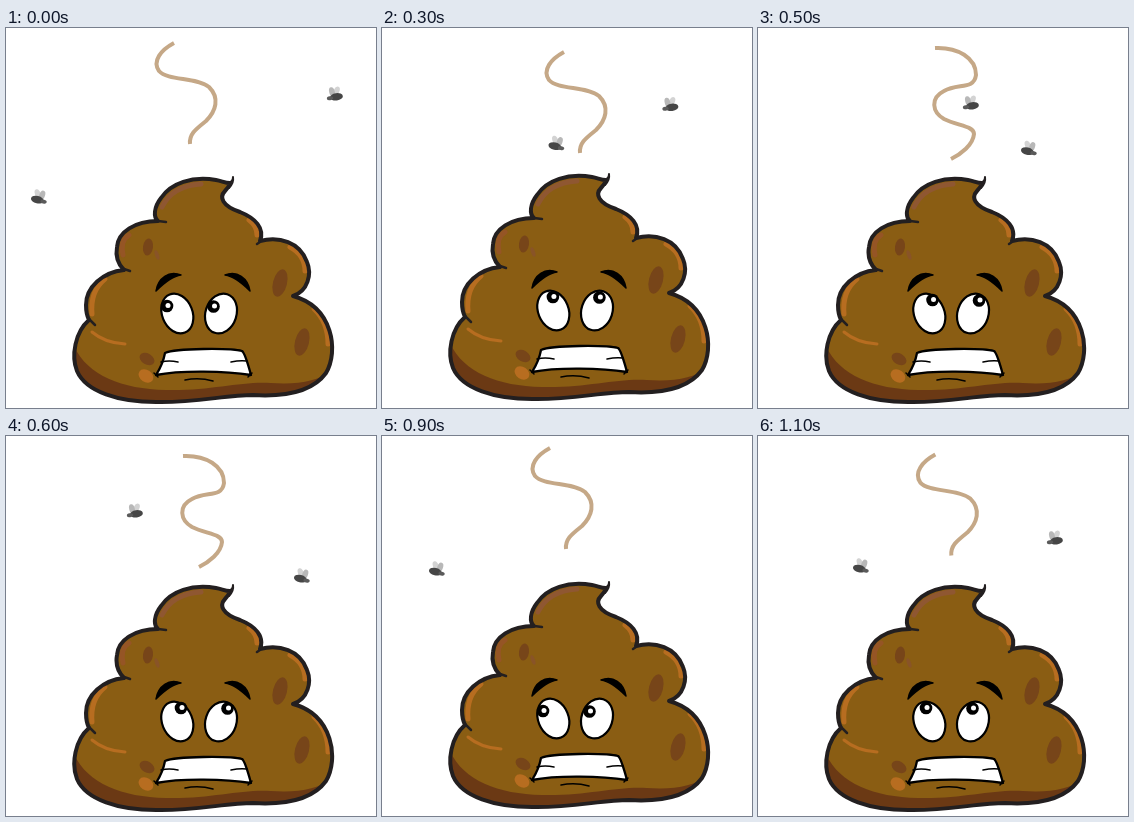
These frames come from a looping animation (370x380 px, 1200 ms). An HTML page:

```html
<!DOCTYPE html>
<html lang="en">
<head>
<meta charset="utf-8">
<title>Worried heap</title>
<style>
  html, body { margin: 0; width: 100%; height: 100%; overflow: hidden; background: #fff; }
  svg { display: block; width: 370px; height: 380px; }
  .line { fill: none; stroke-linecap: round; stroke-linejoin: round; }
</style>
</head>
<body>
<svg viewBox="0 0 370 380">
  <defs>
    <path id="shape" d="M224 155 C219 155 216 153 210 152 C186 148 165 155 155 170 C148 179 147 189 152 193
      C129 193 112 204 111 219 C109 230 113 237 118 242 C97 244 80 259 80 277 C80 283 81 288 83 292
      C69 304 65 328 71 343 C80 364 113 374 150 374 C188 375 220 367 247 367 C280 369 307 363 320 345
      C333 323 327 279 287 268 C302 263 306 246 301 234 C294 214 273 208 254 213
      C259 200 249 190 234 184 C216 178 213 169 219 163 Q223 159 224 155 Z"/>
    <clipPath id="inside"><use href="#shape"/></clipPath>
    <g id="fly">
      <ellipse cx="-1.5" cy="-3" rx="2.8" ry="4.8" fill="#d3d3d3" transform="rotate(-25 -1.5 -3)"/>
      <ellipse cx="3" cy="-2" rx="2.8" ry="4.8" fill="#b8b8b8" transform="rotate(15 3 -2)"/>
      <ellipse cx="-1" cy="3" rx="6.5" ry="3.7" fill="#464646" transform="rotate(8)"/>
      <ellipse cx="5.5" cy="3.5" rx="3.2" ry="2" fill="#5a5a5a" transform="rotate(8)"/>
    </g>
    <g id="pupil">
      <circle r="6.3"/>
      <circle cx="1" cy="-.5" r="2.5" fill="#fff"/>
    </g>
  </defs>

  <g id="scene">
    <path id="steam" class="line" stroke="#c5a887" stroke-width="4" style="stroke-linecap:butt"/>

    <g clip-path="url(#inside)">
      <use href="#shape" fill="#6b3914"/>
      <path fill="#8a5d13" d="M60 140 H340 V325 C325 352 300 357 265 355 C235 353 205 363 160 362 C115 361 80 347 67 316 Z"/>
    </g>
    <g class="line" stroke="#b76d20" stroke-width="5">
      <path stroke="#8f5731" d="M156 179 Q166 158 195 156"/>
      <path stroke="#955525" d="M117 227 Q114 212 123 207"/>
      <path d="M86 286 Q84 263 99 251"/>
      <path d="M86 304 Q99 315 119 316" stroke-width="3"/>
      <path d="M243 192 Q251 198 251 207"/>
      <path d="M284 219 Q299 227 299 243"/>
      <path d="M308 281 Q322 294 322 316"/>
    </g>
    <g fill="#774519">
      <ellipse cx="142" cy="219" rx="5" ry="8.5" transform="rotate(8 142 219)"/>
      <ellipse cx="274" cy="255" rx="7" ry="14" transform="rotate(14 274 255)"/>
      <ellipse cx="296" cy="314" rx="7" ry="14" transform="rotate(14 296 314)"/>
      <ellipse cx="141" cy="331" rx="8" ry="5.5" transform="rotate(30 141 331)"/>
      <ellipse cx="151" cy="227" rx="2" ry="5" fill="#895427" transform="rotate(-20 151 227)"/>
      <ellipse cx="140" cy="348" rx="8" ry="6" fill="#b76d20" transform="rotate(35 140 348)"/>
    </g>
    <use href="#shape" class="line" stroke="#231f20" stroke-width="4"/>
    <path class="line" stroke="#231f20" stroke-width="2.5"
      d="M152 193 L160 194 M118 241 L124 243 M83 291 L89 297 M254 214 L251 216"/>
    <path class="line" stroke="#231f20" stroke-width="2" d="M222 155 Q227 154 227 149 Q228 155 223 160"/>

    <path d="M150 263 C152 250 163 242 175 247 C166 248 158 255 150 263 Z M244 263 C242 250 231 242 219 247 C228 248 236 255 244 263 Z"
      stroke="#000" stroke-width="1.5" stroke-linejoin="round"/>
    <g fill="#fff" stroke="#000" stroke-width="2.2">
      <ellipse cx="171.3" cy="285.5" rx="15.2" ry="20.5" transform="rotate(-22 171.3 285.5)"/>
      <ellipse cx="215" cy="285.5" rx="15.5" ry="20.3" transform="rotate(18 215 285.5)"/>
    </g>
    <use id="leftPupil" href="#pupil"/>
    <use id="rightPupil" href="#pupil"/>

    <path fill="#fff" stroke="#000" stroke-width="2.3" stroke-linejoin="round"
      d="M159 325 C170 320 225 320 236 323 Q239 325 245 347 C220 343 175 342 150 347 Q157 336 159 325 Z"/>
    <path class="line" stroke="#000" stroke-width="1.5"
      d="M155 334 Q163 332 172 334 M225 334 Q234 332 241 333 M148 345 L152 349 M242 349 L246 345 M179 352 Q193 349 207 353"/>
  </g>
  <use id="flyA" href="#fly"/>
  <use id="flyB" href="#fly"/>
</svg>
<script>
const $ = id => document.getElementById(id);
const STEP = 100, STEPS = 12, CYCLE = 9;

const bend = "M168 15C155 22 146 33 153 43C162 53 190 49 203 59C214 70 210 83 200 93C190 101 183 106 184 116";
const wave = "M177 20C200 19 218 30 218 47C216 62 200 55 186 63C172 70 174 84 186 91C200 98 216 98 216 106C215 117 203 126 193 131";

// Key points of each flight: step, x, y
const flightA = [[0, 33, 169], [2, 103, 130], [4, 246, 101], [6, 296, 140], [8, 246, 101], [9, 55, 133], [11, 103, 130]];
const flightB = [[0, 329, 66], [2, 280, 78], [4, 297, 75], [6, 129, 75], [8, 172, 69], [9, -20, 85], [11, 297, 102]];

function along(keys, step) {
  const n = keys.findIndex(key => key[0] >= step);
  const [t1, x1, y1] = keys[n];
  const [t0, x0, y0] = keys[Math.max(0, n - 1)];
  const p = t1 > t0 ? (step - t0) / (t1 - t0) : 0;
  return [x0 + (x1 - x0) * p, y0 + (y1 - y0) * p];
}

function place(id, [x, y], extra = "") {
  $(id).setAttribute("transform", `translate(${x} ${y}) ${extra}`);
}

function draw(time) {
  const step = Math.floor(time / STEP) % STEPS;
  const phase = step % CYCLE;
  place("scene", [0, step % 6 === 3 ? -3 : 0]);

  const wavy = phase >= 4 && phase <= 6;
  const rise = wavy ? 0 : Math.min(1, phase / 3);
  $("steam").setAttribute("d", wavy ? wave : bend);
  place("steam", [14 * rise, 12 * rise ** 3]);

  // The eyes sweep right and lift as they follow the flies.
  const gazeX = 161 + 14 * Math.sin(Math.PI * phase / 12);
  const gazeY = 278 - 6 * Math.min(1, phase / 2);
  place("leftPupil", [gazeX, gazeY]);
  place("rightPupil", [gazeX + 46.5, gazeY + 0.5]);

  place("flyA", along(flightA, step), "rotate(5)");
  place("flyB", along(flightB, step), "scale(-1 1)");
}

const start = performance.now();
function tick() {
  draw(performance.now() - start);
  requestAnimationFrame(tick);
}
tick();
</script>
</body>
</html>
```
